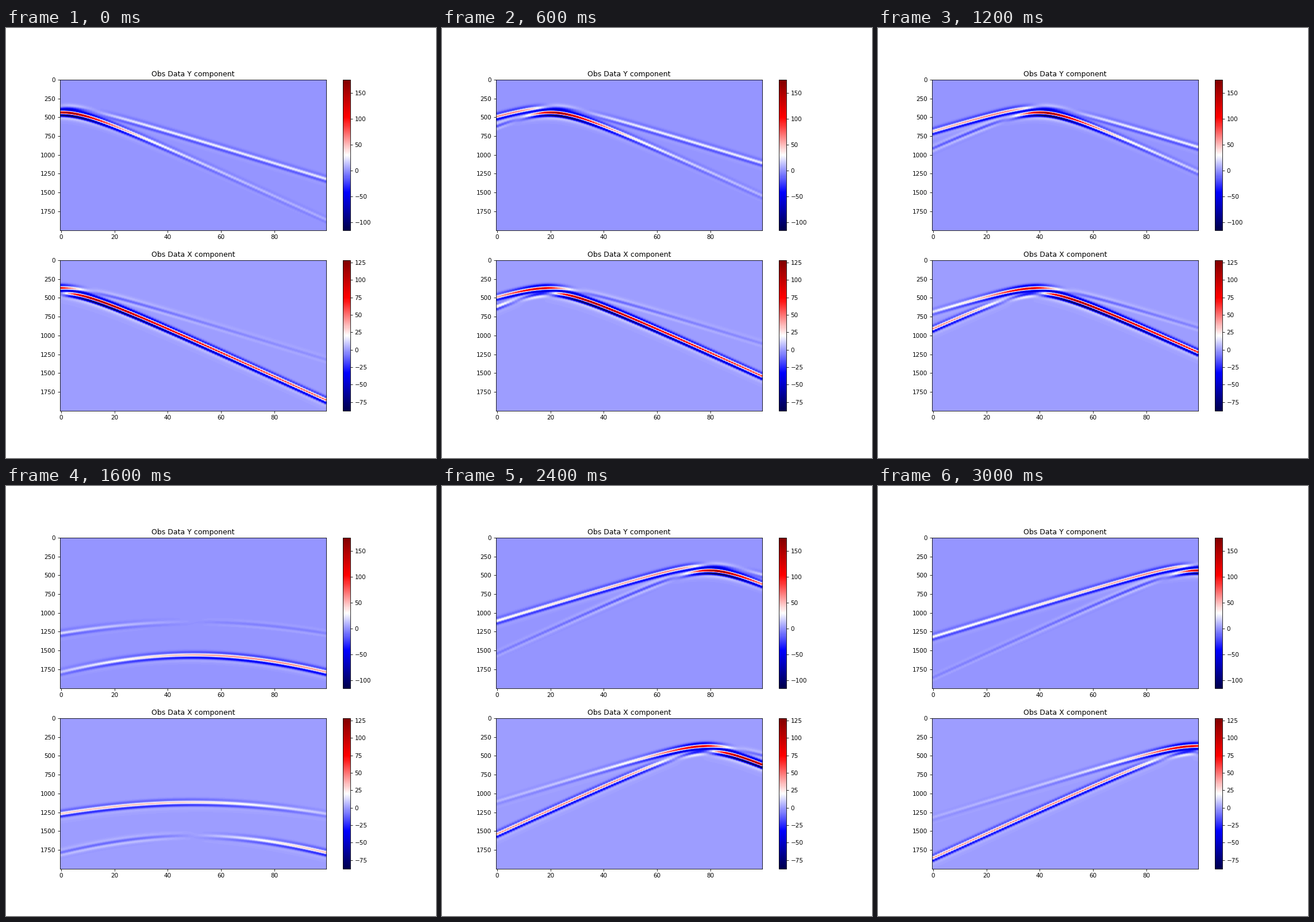
A matplotlib script for the animation above (3100 ms loop, 748 by 748 pixels).

```python
import numpy as np
import matplotlib.pyplot as plt
from matplotlib.animation import FuncAnimation

SHOTS = 31
SAMPLES = 2000
RECEIVERS = np.arange(100)
P_SLOW, S_SLOW = 10.82, 16.22    # samples per receiver spacing
NEAR, FAR = 12.3, 81.5           # distance from source to receiver line
DEEP_SHOT = 16
DELAY, SIGMA = 243, 23           # source pulse timing, in samples
FFT_LEN = 2560

time = np.arange(SAMPLES, dtype=float)


def pulse_spectrum():
    """Second derivative of a Ricker pulse."""
    x = (np.arange(512) - DELAY) / SIGMA
    return np.fft.rfft(-(x**4 - 6 * x**2 + 3) * np.exp(-x**2 / 2), FFT_LEN)


PULSE = pulse_spectrum()


def front(r, slowness):
    """Time integrals of 1/q and q, with q = sqrt(t^2 - arrival^2)."""
    arrival = slowness * r
    q = np.sqrt(np.maximum(time**2 - arrival**2, 0))
    a = np.arccosh(np.maximum(time / arrival, 1))
    return a, (time * q - arrival**2 * a) / 2


def shape_pulse(response):
    spectrum = np.fft.rfft(response, FFT_LEN, axis=1) * PULSE
    return np.fft.irfft(spectrum, FFT_LEN, axis=1)[:, :SAMPLES]


def shot_position(i):
    if i == DEEP_SHOT:
        return 49.5, FAR
    return RECEIVERS[-1] * i / (SHOTS - 1), NEAR


def gather(i):
    """Particle velocity (Y, X) of a diagonal point force in a 2D solid."""
    x0, depth = shot_position(i)
    offset = (RECEIVERS - x0)[:, None]
    r = np.hypot(offset, depth)
    across, along = -depth / r, offset / r

    p, p_int = front(r, P_SLOW)
    s, s_int = front(r, S_SLOW)
    near_field = (p_int - s_int) / r**2
    radial = shape_pulse(P_SLOW**2 * p + near_field) * (across + along)
    transverse = shape_pulse(S_SLOW**2 * s - near_field) * (along - across)

    y = radial * along - transverse * across
    x = radial * across + transverse * along
    return y.T, x.T


first = gather(0)
gain = 176.2 / first[0].max()

fig, axes = plt.subplots(2, 1, figsize=(10, 10), dpi=74.8)
limits = [(-115.6, 176.2), (-87.3, 128.3)]
images = []
for ax, name, data, (low, high) in zip(axes, "YX", first, limits):
    image = ax.imshow(data * gain, cmap="seismic", aspect="auto",
                      vmin=low, vmax=high)
    ax.set_title(f"Obs Data {name} component")
    fig.colorbar(image, ax=ax)
    images.append(image)


def update(i):
    for image, data in zip(images, gather(i)):
        image.set_data(data * gain)
    return images


anim = FuncAnimation(fig, update, frames=SHOTS, interval=100,
                     repeat=True, repeat_delay=0)
plt.show()
```
